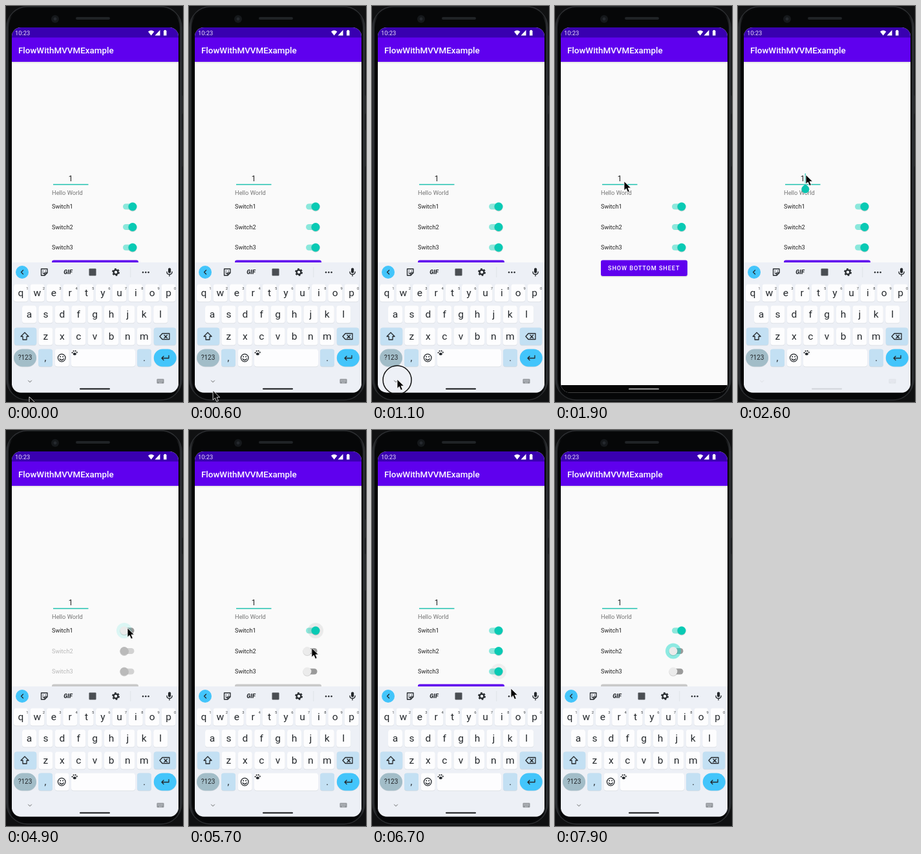
Recreate the animation shown at these times as an HTML page. Size 274x610 px, loop 8000 ms.

```html
<!DOCTYPE html>
<html lang="en">
<head>
<meta charset="utf-8">
<title>Switches and keyboard</title>
<style>
html, body { margin: 0; width: 100%; height: 100%; overflow: hidden; background: #101112; }
svg { display: block; width: 100vw; height: 100vh; font-family: Roboto, "Noto Sans", sans-serif; }
.icon { fill: none; stroke: #24282c; stroke-width: 1.3; stroke-linecap: round; stroke-linejoin: round; }
</style>
</head>
<body>
<svg id="stage" viewBox="0 0 274 610">
  <defs>
    <clipPath id="screen"><rect x="9" y="33" width="258" height="562.5" rx="14"/></clipPath>
    <linearGradient id="edge"><stop stop-color="#333639"/><stop offset=".03" stop-color="#08090a"/><stop offset=".97" stop-color="#08090a"/><stop offset="1" stop-color="#34373a"/></linearGradient>
  </defs>
  <rect width="274" height="610" fill="#101112"/>
  <rect x="268" y="137" width="5.5" height="30" rx="2" fill="#292c2e"/>
  <rect x="268" y="190" width="5.5" height="58" rx="2" fill="#292c2e"/>
  <rect x="1" y="1" width="271" height="606" rx="32" fill="url(#edge)" stroke="#2e3033" stroke-width="1.4"/>
  <rect x="4" y="4" width="265" height="600" rx="29" fill="#060708"/>
  <circle cx="76" cy="20" r="6" fill="#15181b"/>
  <circle cx="76" cy="20" r="2.4" fill="#25292e"/>
  <rect x="108" y="17" width="53" height="4" rx="2" fill="#202326"/>

  <g clip-path="url(#screen)">
    <rect x="9" y="33" width="258" height="563" fill="#fafafa"/>
    <rect x="9" y="86" width="258" height="2" fill="#000" opacity=".07"/>
    <rect x="9" y="48" width="258" height="38" fill="#5f00ee"/>
    <rect x="9" y="33" width="258" height="15.5" fill="#3900b0"/>
    <text x="14" y="45" font-size="9.3" fill="#e9e0fa">10:23</text>
    <path d="M220 39.5Q224.700 35.500 229.400 39.500L224.700 45.500ZM230.500 45.500H238.500V37ZM244 38h1v-1h2.500v1h1v7.500h-4.500Z" fill="#fff"/>
    <text x="19" y="72.500" font-size="13.4" font-weight="500" fill="#fff">FlowWithMVVMExample</text>
    <text x="100" y="270" font-size="12" text-anchor="middle" fill="#222">1</text>
    <rect x="73" y="274.300" width="54.500" height="1.400" fill="#16bfad"/>
    <rect id="caret" x="103.600" y="258" width="1.200" height="15" fill="#16c5b1"/>
    <text x="71" y="290.500" font-size="9.3" fill="#747474">Hello World</text>
    <path id="handle" d="M104.300 274.500L108.600 278A6 6 0 1 1 100 278Z" fill="#0bc4b0"/>
    <g id="switches"></g>
    <rect x="71" y="393" width="134" height="24.500" rx="3" fill="#000" opacity=".12"/>
    <rect id="button" x="71" y="391.500" width="134" height="24.500" rx="3"/>
    <text id="buttonText" x="82" y="407.200" font-size="9.2" font-weight="500" letter-spacing=".88">SHOW BOTTOM SHEET</text>
    <rect x="9" y="584" width="258" height="12" fill="#050505"/>
    <rect x="114" y="589" width="47" height="1.800" rx=".9" fill="#a5a5a5"/>
    <g id="keyboard"></g>
  </g>

  <circle id="ring" cx="39" cy="576" r="22" fill="none" stroke="#111" stroke-width="1.500"/>
  <path id="cursor" d="M0 0V14.300L3.300 11.300L5.600 16.800L8.300 15.700L6 10.300H10.500Z" fill="#050505" stroke="#fff" stroke-width=".8" stroke-linejoin="round"/>
</svg>
<script>
const LOOP = 8000;
const $ = id => document.getElementById(id);

function add(parent, tag, attrs, text) {
  const node = document.createElementNS('http://www.w3.org/2000/svg', tag);
  set(node, attrs);
  if (text) node.textContent = text;
  parent.appendChild(node);
  return node;
}
function set(node, attrs) {
  for (const name in attrs) node.setAttribute(name, attrs[name]);
}
const clamp = v => Math.max(0, Math.min(1, v));
const ease = v => v * v * (3 - 2 * v);
const ramp = (t, from, length) => ease(clamp((t - from) / length));
const within = (t, a, b) => t >= a && t < b;
const show = (id, visible) => set($(id), { visibility: visible ? 'visible' : 'hidden' });

// Keyboard
const keyboard = $('keyboard');
const PALE = '#c3e0f3', SKY = '#43c5fb';
const INK = '#24282c';

function key(cx, cy, width, label, fill = '#fdfdfe', size = 15.5, rx = 4) {
  add(keyboard, 'rect', { x: cx - width / 2, y: cy - 13.2, width, height: 27.4, rx, fill: '#d5d9df' });
  add(keyboard, 'rect', { x: cx - width / 2, y: cy - 13.5, width, height: 27, rx, fill });
  label && add(keyboard, 'text', { x: cx, y: cy + size * .34, 'font-size': size, 'text-anchor': 'middle', fill: INK }, label);
}
function keyRow(letters, x, y) {
  [...letters].forEach((letter, i) => key(x + i * 25.4, y, 22, letter));
}
const icon = (d, attrs = {}) => add(keyboard, 'path', { d, class: 'icon', ...attrs });
const dot = (cx, cy, r, fill = INK) => add(keyboard, 'circle', { cx, cy, r, fill });

function buildKeyboard() {
  add(keyboard, 'rect', { x: 9, y: 395, width: 258, height: 202, fill: '#edf0f6' });
  dot(25, 410, 10, SKY);
  icon('M26.500 407L23.500 410L26.500 413');
  icon('M54.500 405H64V411L60 415H54.500ZM60 415V411H64M57 411Q59 413 60.500 411.500');
  dot(57.3, 408.3, .8);
  dot(61.3, 408.3, .8);
  add(keyboard, 'text', { x: 96, y: 413.2, 'font-size': 9, 'font-weight': 900, 'font-style': 'italic', 'text-anchor': 'middle', fill: INK }, 'GIF');
  add(keyboard, 'rect', { x: 128.5, y: 404.5, width: 11, height: 11, rx: 1, fill: '#4a4e53' });
  add(keyboard, 'circle', { cx: 170, cy: 410, r: 3.4, fill: 'none', stroke: INK, 'stroke-width': 2.2 });
  add(keyboard, 'circle', { cx: 170, cy: 410, r: 5.1, fill: 'none', stroke: INK, 'stroke-width': 1.7, 'stroke-dasharray': '2.67 2.67' });
  add(keyboard, 'rect', { x: 192.5, y: 402, width: .7, height: 16, fill: '#d9dde2' });
  [212, 216.3, 220.6].forEach(x => dot(x, 410.3, 1.2));
  add(keyboard, 'rect', { x: 251, y: 403.5, width: 4.2, height: 8, rx: 2.1, fill: INK });
  icon('M249 409.500Q249 413.500 253 413.500T257.200 409.500M253 413.500V416');

  keyRow('qwertyuiop', 23, 442);
  [...'1234567890'].forEach((digit, i) =>
    add(keyboard, 'text', { x: 33 + i * 25.4, y: 437, 'font-size': 5.8, 'text-anchor': 'middle', fill: '#3d4145' }, digit));
  keyRow('asdfghjkl', 36, 475);
  key(30, 509, 34.5, '', PALE);
  icon('M29 503L35 509H32V514H26V509H23Z');
  keyRow('zxcvbnm', 61.4, 509);
  key(246, 509, 34.5, '', PALE);
  icon('M238 509L242 504.500H253V513.500H242ZM245 507L249.500 511.500M249.500 507L245 511.500');
  key(29.5, 542, 35, '?123', '#a2bdc8', 10, 13.5);
  key(61, 542, 22, ',', PALE, 14);
  key(86.7, 542, 22, '');
  icon('M92 542A5.800 5.800 0 1 1 80.400 542A5.800 5.800 0 1 1 92 542M83.200 543.500Q86.200 547.500 89.200 543.500');
  dot(84.2, 540.3, 1);
  dot(88.2, 540.3, 1);
  key(150.5, 542, 99, '');
  add(keyboard, 'ellipse', { cx: 106.3, cy: 536, rx: 2.6, ry: 2, fill: INK });
  [[102.6, 534], [104.6, 531.6], [107.6, 531.4], [109.8, 533.6]].forEach(([x, y]) => dot(x, y, 1.1));
  key(214, 542, 22, '.', PALE, 14);
  key(246.3, 542, 35, '', SKY, 10, 13.5);
  icon('M252 538.500V542.500H241M244 539.500L241 542.500L244 545.500');

  const nav = add(keyboard, 'g', { id: 'nav' });
  add(nav, 'path', { d: 'M34.500 577L37 579.500L39.500 577', class: 'icon', style: 'stroke:#666;stroke-width:1' });
  add(nav, 'rect', { x: 114, y: 588.8, width: 47, height: 1.9, rx: 1, fill: '#17191b' });
  add(nav, 'rect', { x: 233.5, y: 574.5, width: 11, height: 7, rx: 1, fill: '#8d9196' });
  add(nav, 'path', { d: 'M235 576.500H243M235 578.300H243M237 580.200H241', stroke: '#edf0f6', 'stroke-width': .8, 'stroke-dasharray': '1 .7' });
}

// Switches: times at which each one flips, starting from on
const switches = [
  { y: 309, flips: [4420, 5300], taps: [4420, 5300] },
  { y: 340.5, flips: [4420, 5850, 7650], taps: [5850, 7650] },
  { y: 372, flips: [4420, 6250, 7200], taps: [6250, 7200] }
];
const isOn = (s, t) => s.flips.filter(f => f <= t).length % 2 === 0;

function buildSwitches() {
  const group = $('switches');
  switches.forEach((s, i) => {
    s.label = add(group, 'text', { x: 71, y: s.y + 3.2, 'font-size': 9.2 }, 'Switch' + (i + 1));
    s.track = add(group, 'rect', { x: 181, y: s.y - 4.5, width: 17.5, height: 9, rx: 4.5 });
    s.ripple = add(group, 'circle', { cy: s.y });
    s.shadow = add(group, 'circle', { cy: s.y + .7, r: 6.7, fill: '#000', opacity: .16 });
    s.thumb = add(group, 'circle', { cy: s.y, r: 6.5 });
  });
}

function drawSwitch(s, t, enabled) {
  const on = isOn(s, t);
  const last = s.flips.filter(f => f <= t).pop();
  const moved = last === undefined ? 1 : ramp(t, last, 200);
  const cx = 183 + 13 * (on ? moved : 1 - moved);
  const tap = s.taps.filter(f => f <= t).pop();
  const age = tap === undefined ? 1 : clamp((t - tap) / 560);
  set(s.label, { fill: enabled ? '#202020' : '#b8b8b8' });
  set(s.track, { fill: on ? '#8ce8dc' : enabled ? '#9a9a9a' : '#d2d2d2' });
  set(s.thumb, { cx, fill: on ? '#08cab4' : enabled ? '#ebebeb' : '#bababa' });
  set(s.shadow, { cx });
  set(s.ripple, { cx, r: 5 + 7 * clamp(age * 3), fill: on ? '#888' : '#22dccb', opacity: .5 * Math.min(1, 2 - 2 * age) * (on ? .5 : 1) });
}

// Pointer stops: time, x, y
const path = [
  [0, 36, 602], [400, 36, 602], [900, 39, 575], [1250, 39, 575], [1850, 107, 270],
  [2050, 107, 270], [2250, 105, 260], [3700, 105, 260], [4300, 188, 305], [5350, 188, 305],
  [5750, 190, 337], [5920, 190, 337], [6180, 192, 369], [6350, 192, 369], [6680, 215, 398],
  [6800, 215, 398], [7100, 190, 369], [7250, 190, 369], [7550, 186, 338], [8000, 186, 338]
];
function pointer(t) {
  const i = path.findIndex(stop => stop[0] > t);
  const [t0, x0, y0] = path[i - 1], [t1, x1, y1] = path[i];
  const k = ramp(t, t0, t1 - t0);
  return [x0 + (x1 - x0) * k, y0 + (y1 - y0) * k];
}

function draw(t) {
  const hidden = ramp(t, 1250, 250) - ramp(t, 2280, 250);
  set(keyboard, { transform: `translate(0 ${hidden * 203})` });
  set($('nav'), { opacity: t < 2000 ? 1 : .12 + .88 * ramp(t, 2600, 250) });

  const masterOn = isOn(switches[0], t);
  switches.forEach((s, i) => drawSwitch(s, t, i === 0 || masterOn));
  const ready = switches.every(s => isOn(s, t));
  set($('button'), { fill: ready ? '#5f00ee' : '#c9c9c9' });
  set($('buttonText'), { fill: ready ? '#fff' : '#8e8e8e' });

  show('handle', within(t, 2250, 4300));
  show('caret', within(t, 2250, 4300) && (t - 2250) % 1000 < 500);
  show('ring', within(t, 1000, 1200));
  show('cursor', t < 7740);
  set($('cursor'), { transform: `translate(${pointer(t)})` });
}

buildKeyboard();
buildSwitches();
const start = performance.now();
function frame() {
  draw((performance.now() - start) % LOOP);
  requestAnimationFrame(frame);
}
frame();
</script>
</body>
</html>
```
